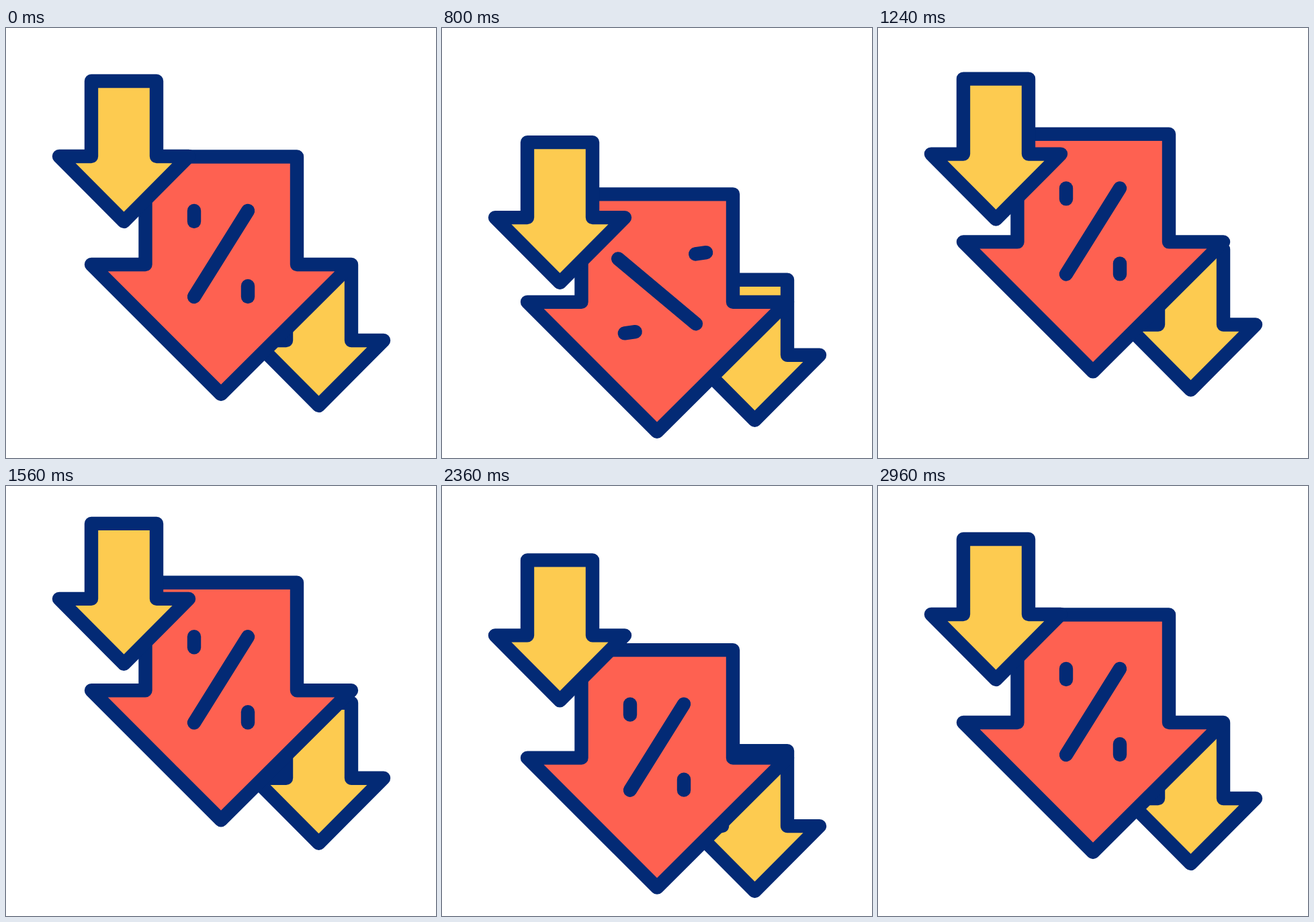
These frames come from a looping animation (640 px wide and 640 px high, 3000 ms). An HTML page:

```html
<!DOCTYPE html>
<html lang="en">
<head>
<meta charset="utf-8">
<title>Falling prices</title>
<style>
  html, body { margin: 0; height: 100%; overflow: hidden; background: #fff; }
  svg { display: block; width: 100%; height: 100%; }
  path { stroke: #032a75; stroke-width: 20.4; stroke-linecap: round; stroke-linejoin: round; }
</style>
</head>
<body>
<svg viewBox="0 0 640 640">
  <defs><path id="small" fill="#fdcb50" d="M127 79H224V191H272L175.5 288 79 191H127Z"/></defs>
  <g id="right"><use href="#small" x="290" y="274"/></g>
  <g id="middle">
    <path fill="#fe6151" d="M207.5 191.5H433V352H514L320 545 127 352H207.5Z"/>
    <g transform="translate(320 336)">
      <path id="slash" d="M40 -64L-40 64"/>
      <path id="dot1" d="M0 -8V8"/>
      <path id="dot2" d="M0 -8V8"/>
    </g>
  </g>
  <g id="left"><use href="#small"/></g>
</svg>
<script>
const LOOP = 3000, STEP = 40;
const TROUGH = 1450, CREST = 2230, REST = 2960;

const ease = (t, from, to) => {
  const u = Math.min(1, Math.max(0, (t - from) / (to - from)));
  return (1 - Math.cos(Math.PI * u)) / 2;
};

const place = (id, x, y, angle = 0) => document.getElementById(id)
  .setAttribute("transform", `translate(${x} ${y}) rotate(${angle})`);

// Dip, rise above the start, dip again, settle
function bounce(id, t, start, peak, dip, lift, again) {
  const y = dip * ease(t, start, peak)
    - (dip + lift) * ease(t, peak, TROUGH)
    + (lift + again) * ease(t, TROUGH, CREST)
    - again * ease(t, CREST, REST);
  place(id, 0, y);
}

// Half a turn around the slash, swinging outwards on the way
function orbit(id, t, side, end, swing, tilt) {
  const turn = ease(t, 420, end);
  const angle = Math.atan2(56 * side, 40 * side) - Math.PI * turn;
  const radius = Math.hypot(40, 56) + swing * Math.sin(Math.PI * turn);
  place(id, radius * Math.cos(angle), radius * Math.sin(angle), tilt);
}

function draw(now) {
  const t = Math.floor(now % LOOP / STEP) * STEP;
  bounce("left", t, 20, 710, 95.5, 26, 34);
  bounce("middle", t, 160, 662, 64.5, 53, 57);
  bounce("right", t, 77, 700, 24.2, 34, 44.5);

  const spin = 180 * ease(t, 437, 1206);
  place("slash", 0, 0, -spin);
  orbit("dot1", t, -1, 1080, 5, spin);
  orbit("dot2", t, 1, 1152, 17.5, spin);
}

const start = performance.now();
function loop() {
  draw(performance.now() - start);
  requestAnimationFrame(loop);
}
loop();
</script>
</body>
</html>
```
